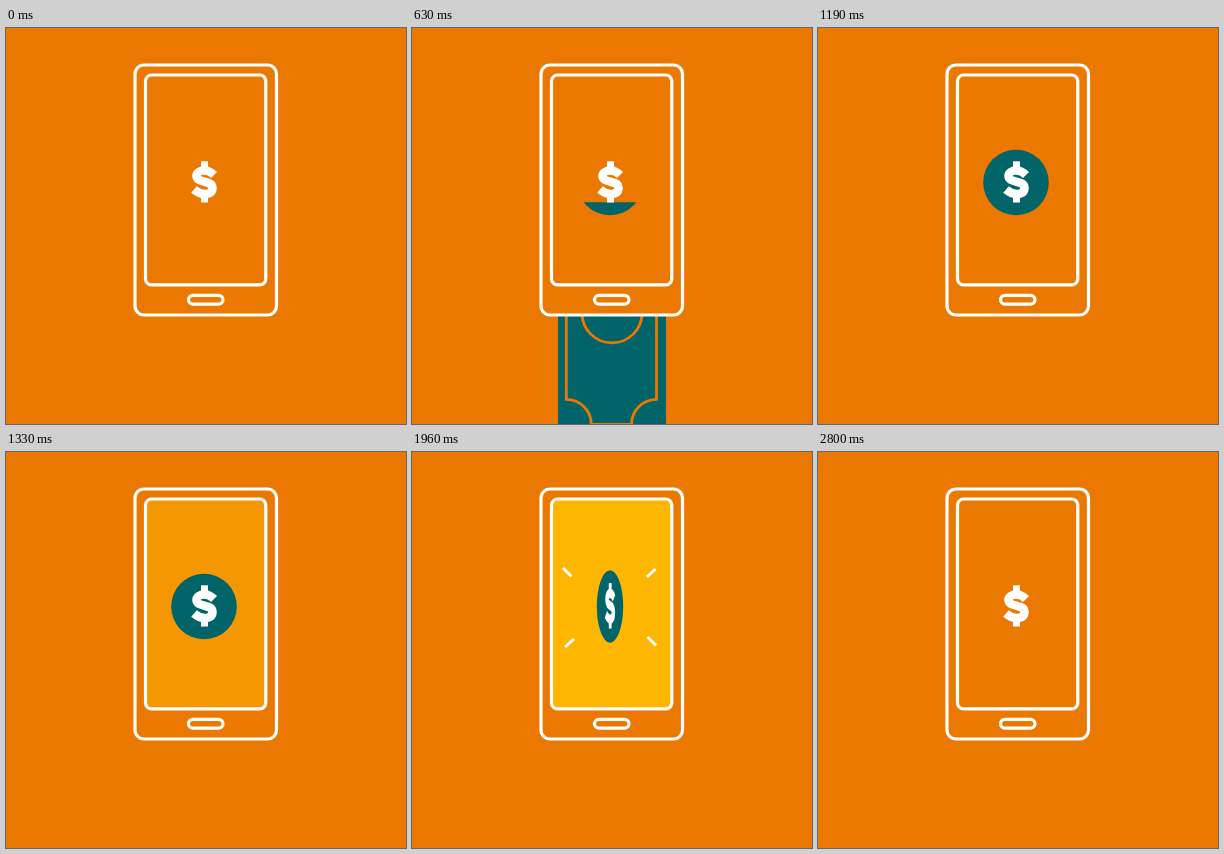
An HTML page with a canvas that plays this animation: 400 px wide and 396 px high, repeating every 3220 ms.

```html
<!DOCTYPE html>
<html lang="en">
<head>
<meta charset="utf-8">
<title>Mobile deposit</title>
<style>
  html, body { margin: 0; width: 100%; height: 100%; overflow: hidden; background: #eb7800; }
  canvas { display: block; }
</style>
</head>
<body>
<canvas id="stage" width="400" height="396"></canvas>
<script>
const ctx = document.getElementById('stage').getContext('2d');
const LOOP = 3220, STEP = 70, LAST = 40;
const ORANGE = '#eb7800', TEAL = '#006469', YELLOW = '#ffb600', WHITE = '#fff';
const COIN = { x: 198, y: 154.5, r: 32.8 };
const BILL = { left: 146, width: 108, half: 122 };

const clamp = v => Math.max(0, Math.min(1, v));

function roundBox(x, y, w, h, r) {
  ctx.beginPath();
  ctx.roundRect(x, y, w, h, r);
  ctx.stroke();
}

function line(x1, y1, x2, y2) {
  ctx.beginPath();
  ctx.moveTo(x1, y1);
  ctx.lineTo(x2, y2);
  ctx.stroke();
}

function drawBill(step) {
  // Quick entry that settles into a steady climb
  const bottom = 355 + 17 * (12 - step) + 82 * Math.exp(-step / 2);
  const top = bottom - 2 * BILL.half;
  const l = 154.3, r = 244.5, t = top + 10, b = bottom - 10.5, notch = 25;
  ctx.save();
  ctx.beginPath();
  ctx.rect(0, 287, 400, 109);
  ctx.clip();
  ctx.fillStyle = TEAL;
  ctx.fillRect(BILL.left, top, BILL.width, bottom - top);
  ctx.strokeStyle = ORANGE;
  ctx.lineWidth = 2.8;
  ctx.beginPath();
  ctx.arc(l, t, notch, Math.PI / 2, 0, true);
  ctx.arc(r, t, notch, Math.PI, Math.PI / 2, true);
  ctx.arc(r, b, notch, -Math.PI / 2, Math.PI, true);
  ctx.arc(l, b, notch, 0, -Math.PI / 2, true);
  ctx.closePath();
  ctx.stroke();
  ctx.beginPath();
  ctx.arc(200, bottom - BILL.half, 30, 0, Math.PI * 2);
  ctx.stroke();
  ctx.restore();
}

function drawCoin(step, alpha) {
  const level = COIN.y + COIN.r - 6.56 * (step - 7);
  ctx.save();
  ctx.globalAlpha = alpha;
  if (step < 17) {
    ctx.beginPath();
    ctx.rect(100, level, 200, 200);
    ctx.clip();
  }
  ctx.fillStyle = TEAL;
  ctx.beginPath();
  ctx.arc(COIN.x, COIN.y, COIN.r, 0, Math.PI * 2);
  ctx.fill();
  ctx.restore();
}

function drawDollar() {
  ctx.fillStyle = ctx.strokeStyle = WHITE;
  ctx.lineWidth = 8.5;
  ctx.fillRect(195, 133.3, 7, 8);
  ctx.fillRect(195, 166.5, 7, 8);
  ctx.beginPath();
  ctx.moveTo(208, 147);
  ctx.bezierCurveTo(205, 144, 202, 142.5, 198.5, 142.5);
  ctx.bezierCurveTo(194, 142.5, 190.5, 144.5, 190.5, 148);
  ctx.bezierCurveTo(190.5, 155.5, 206.5, 151.5, 206.5, 160);
  ctx.bezierCurveTo(206.5, 164.5, 203, 166, 199, 166);
  ctx.bezierCurveTo(195, 166, 191.5, 164.5, 188, 161.5);
  ctx.stroke();
}

function drawSparks() {
  ctx.strokeStyle = WHITE;
  ctx.lineWidth = 3;
  line(151, 116, 159.5, 124.5);
  line(235, 125, 243.5, 117);
  line(153, 195, 162, 187);
  line(235.5, 185, 244, 193.5);
}

function drawPhone() {
  ctx.strokeStyle = WHITE;
  ctx.lineWidth = 3.2;
  roundBox(129, 37, 141.5, 250, 9);
  roundBox(139.5, 47, 120.3, 209.8, 6);
  roundBox(182.5, 267.3, 34.5, 8.8, 4.4);
}

function draw(step) {
  ctx.fillStyle = ORANGE;
  ctx.fillRect(0, 0, 400, 396);
  if (step > 0 && step < 16) drawBill(step);

  const fadeOut = clamp((LAST - step) / 4);
  ctx.globalAlpha = clamp((step - 17) / 4) * fadeOut;
  ctx.fillStyle = YELLOW;
  ctx.fillRect(141, 48, 117.5, 207.5);
  ctx.globalAlpha = 1;

  if (step >= 20 && step < 29) drawSparks();

  const turn = clamp((step - 19.5) / 10.5);
  const grow = 1 + 0.18 * Math.sin(Math.PI * turn);
  ctx.save();
  ctx.translate(COIN.x, COIN.y);
  ctx.scale(grow * Math.cos(2 * Math.PI * turn), grow);
  ctx.translate(-COIN.x, -COIN.y);
  if (step > 7) drawCoin(step, fadeOut);
  drawDollar();
  ctx.restore();

  drawPhone();
}

const start = performance.now();
function tick() {
  const time = (performance.now() - start) % LOOP;
  draw(Math.min(LAST, Math.floor(time / STEP)));
  requestAnimationFrame(tick);
}
tick();
</script>
</body>
</html>
```
